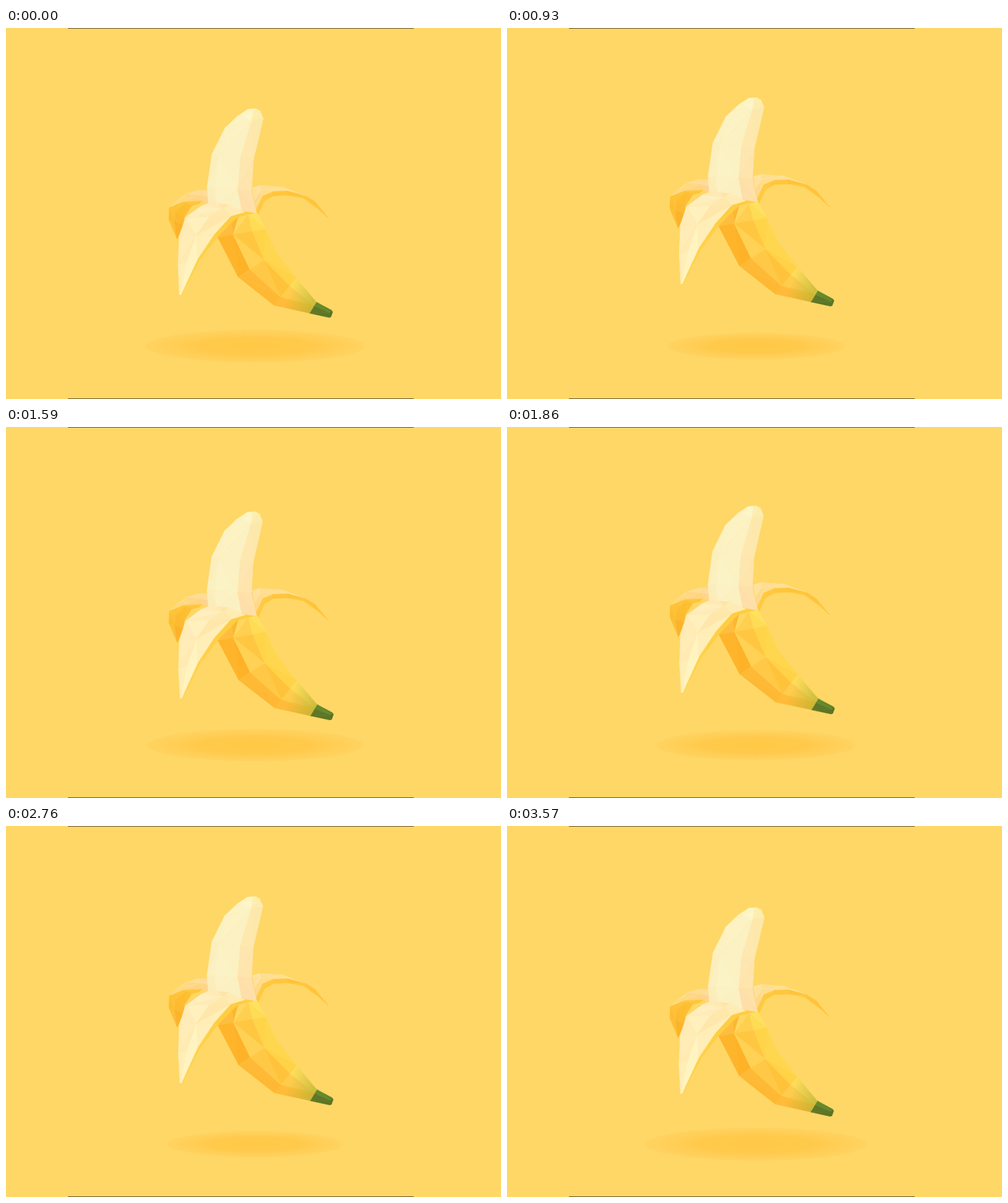
These frames come from a looping animation (800 by 600 pixels, 3600 ms). An HTML page with a canvas:

```html
<!DOCTYPE html>
<html lang="en">
<head>
<meta charset="utf-8">
<title>Floating banana</title>
<style>
  html, body { margin: 0; width: 100%; height: 100%; overflow: hidden; background: #ffd766; }
  canvas { display: block; }
</style>
</head>
<body>
<canvas id="stage" width="800" height="600"></canvas>
<script>
const ctx = document.getElementById('stage').getContext('2d');
const LOOP = 3600, STEP = 30;

let seed = 11;
const random = () => (seed = seed * 16807 % 2147483647) / 2147483647;
const spread = amount => (random() * 2 - 1) * amount;
const lerp = (a, b, t) => a + (b - a) * t;
const channels = hex => [1, 3, 5].map(i => parseInt(hex.slice(i, i + 2), 16));

// Blend two colours, then vary the warmth of the facet a little.
function shade([from, to], t, grain) {
  const start = channels(from), end = channels(to), shift = spread(grain);
  return `rgb(${start.map((c, i) => Math.round(lerp(c, end[i], t) + shift * [0, 0.5, 1][i]))})`;
}

// A low-poly surface between two rails. Each row is [x1, y1, x2, y2];
// each column between the cuts has its own colour ramp from first to last row.
function skin(rows, cuts, ramps, { grain = 0, wobble = 0 } = {}) {
  const last = rows.length - 1;
  const grid = rows.map(([x1, y1, x2, y2], r) => cuts.map((cut, c) => {
    const inside = r > 0 && r < last && c > 0 && c < cuts.length - 1;
    const u = cut + (inside ? spread(wobble) : 0);
    return [lerp(x1, x2, u), lerp(y1, y2, u)];
  }));
  const facets = [];
  for (let r = 0; r < last; r++) {
    ramps.forEach((ramp, c) => {
      const a = grid[r][c], b = grid[r][c + 1], d = grid[r + 1][c], e = grid[r + 1][c + 1];
      const halves = (r + c) % 2 ? [[a, b, d], [b, e, d]] : [[a, b, e], [a, e, d]];
      halves.forEach((points, i) => facets.push({
        color: shade(ramp, (r + 0.35 + i * 0.3) / last, grain),
        path: new Path2D(`M${points.flat().join(' ')}z`)
      }));
    });
  }
  return facets;
}

const backOutside = skin(
  [[318, 278, 312, 284], [285, 280, 300, 287], [264, 290, 288, 306], [263, 309, 287, 318], [276, 340, 277, 340]],
  [0, 0.4, 1], [['#ffcb3d', '#fdb932'], ['#ffc83a', '#fab22d']], { grain: 6 });

const backInside = skin(
  [[326, 262, 328, 284], [311, 262, 317, 279], [290, 268, 287, 280], [268, 284, 267, 288]],
  [0, 0.5, 1], [['#fedb9c', '#ffdc80'], ['#fed695', '#ffd97c']], { grain: 10 });

const rightInside = skin(
  [[398, 258, 406, 299], [411, 254, 414, 272], [447, 257, 432, 265], [484, 271, 484, 271]],
  [0, 0.5, 1], [['#ffe09c', '#ffe294'], ['#ffda8e', '#ffdd88']], { grain: 6 });

const rightRim = skin(
  [[404, 294, 407, 303], [415, 271, 418, 279], [432, 264, 432, 271], [455, 263, 455, 270],
   [484, 271, 481, 275], [500, 281, 507, 294], [521, 307, 521, 307]],
  [0, 1], [['#ffc93f', '#ffc23a']], { grain: 4 });

const bodyRows = [[363, 306, 406, 299], [342, 338, 420, 325], [375, 402, 437, 363], [433, 448, 469, 404], [491, 461, 502, 443]];
const body = skin(bodyRows, [0, 0.3, 0.66, 1],
  [['#fdb832', '#ffba38'], ['#ffd256', '#ffc43e'], ['#ffdd58', '#ffd44c']], { grain: 14, wobble: 0.07 });

const stem = skin(
  [[491, 461, 502, 443], [522, 468, 526, 456], [525, 467, 528, 459]],
  [0, 0.66, 1], [['#647a28', '#4a6a20'], ['#699030', '#4a6a20']]);

const fruit = skin(
  [[391, 131, 404, 130], [374, 142, 411, 134], [354, 161, 416, 146], [333, 203, 400, 213], [325, 257, 397, 262], [327, 283, 405, 299]],
  [0, 0.17, 0.69, 1],
  [['#fcf6c9', '#fbecba'], ['#fcf6c9', '#fbf0c2'], ['#fdf3b2', '#fedeab']], { grain: 3 });

const frontRows = [[329, 282, 360, 285], [316, 287, 386, 297], [290, 306, 363, 304], [280, 336, 336, 334], [278, 382, 309, 374], [280, 431, 283, 431]];
const front = skin(frontRows, [0, 0.5, 1],
  [['#ffe9b6', '#fff0ba'], ['#ffe8b0', '#fff1ba']], { grain: 12, wobble: 0.12 });

// The peel is thickest where it leaves the fruit and tapers to the tip.
const frontEdge = frontRows.slice(1);
const frontRim = skin(
  frontEdge.map(([, , x, y], i) => [x, y, x + 14 * (1 - i / (frontEdge.length - 1)), y + 2]),
  [0, 1], [['#ffcc40', '#ffd24c']], { grain: 4 });

const ripeness = ctx.createLinearGradient(456, 434, 497, 451);
ripeness.addColorStop(0, 'rgba(186,178,50,0)');
ripeness.addColorStop(1, 'rgba(186,178,50,0.75)');
const [[ax, ay, bx, by], [cx, cy, dx, dy]] = bodyRows.slice(-2);
const bodyEnd = new Path2D(`M${ax} ${ay} ${bx} ${by} ${dx} ${dy} ${cx} ${cy}z`);

const wave = (t, peak, period) => Math.cos(2 * Math.PI * (t - peak) / period);

function drawFacets(list) {
  ctx.lineWidth = 0.4;
  ctx.lineJoin = 'round';
  for (const { color, path } of list) {
    ctx.fillStyle = ctx.strokeStyle = color;
    ctx.fill(path);
    ctx.stroke(path);
  }
}

function drawShadow(t) {
  const radius = 155.5 - 24 * wave(t, 660, LOOP / 2) + 6 * wave(t, 200, LOOP);
  const glow = ctx.createRadialGradient(0, 0, 0, 0, 0, 1);
  glow.addColorStop(0, '#ffc846');
  glow.addColorStop(0.5, '#ffca4b');
  glow.addColorStop(1, '#ffd361');
  ctx.save();
  ctx.translate(402.5, 514.5);
  ctx.scale(radius, radius * 0.15);
  ctx.fillStyle = glow;
  ctx.beginPath();
  ctx.arc(0, 0, 1, 0, 2 * Math.PI);
  ctx.fill();
  ctx.restore();
}

function drawBanana(t) {
  const lift = -9.3 - 16.5 * wave(t, 630, LOOP / 2);
  const tilt = -0.25 * (1 + wave(t, 1980, LOOP)) * Math.PI / 180;
  ctx.save();
  ctx.translate(400, 290 + lift);
  ctx.rotate(tilt);
  ctx.translate(-400, -290);
  [backOutside, backInside, rightInside, rightRim, body].forEach(drawFacets);
  ctx.fillStyle = ripeness;
  ctx.fill(bodyEnd);
  [stem, fruit, frontRim, front].forEach(drawFacets);
  ctx.restore();
}

function render(now) {
  const t = Math.floor((now % LOOP) / STEP) * STEP;
  ctx.fillStyle = '#ffd766';
  ctx.fillRect(0, 0, 800, 600);
  ctx.fillStyle = '#5c4e29';
  ctx.fillRect(100, 0, 559, 1);
  ctx.fillRect(100, 599, 559, 1);
  drawShadow(t);
  drawBanana(t);
}

let start;
function tick(now) {
  start ??= now;
  render(Math.max(0, now - start));
  requestAnimationFrame(tick);
}
render(0);
requestAnimationFrame(tick);
</script>
</body>
</html>
```
